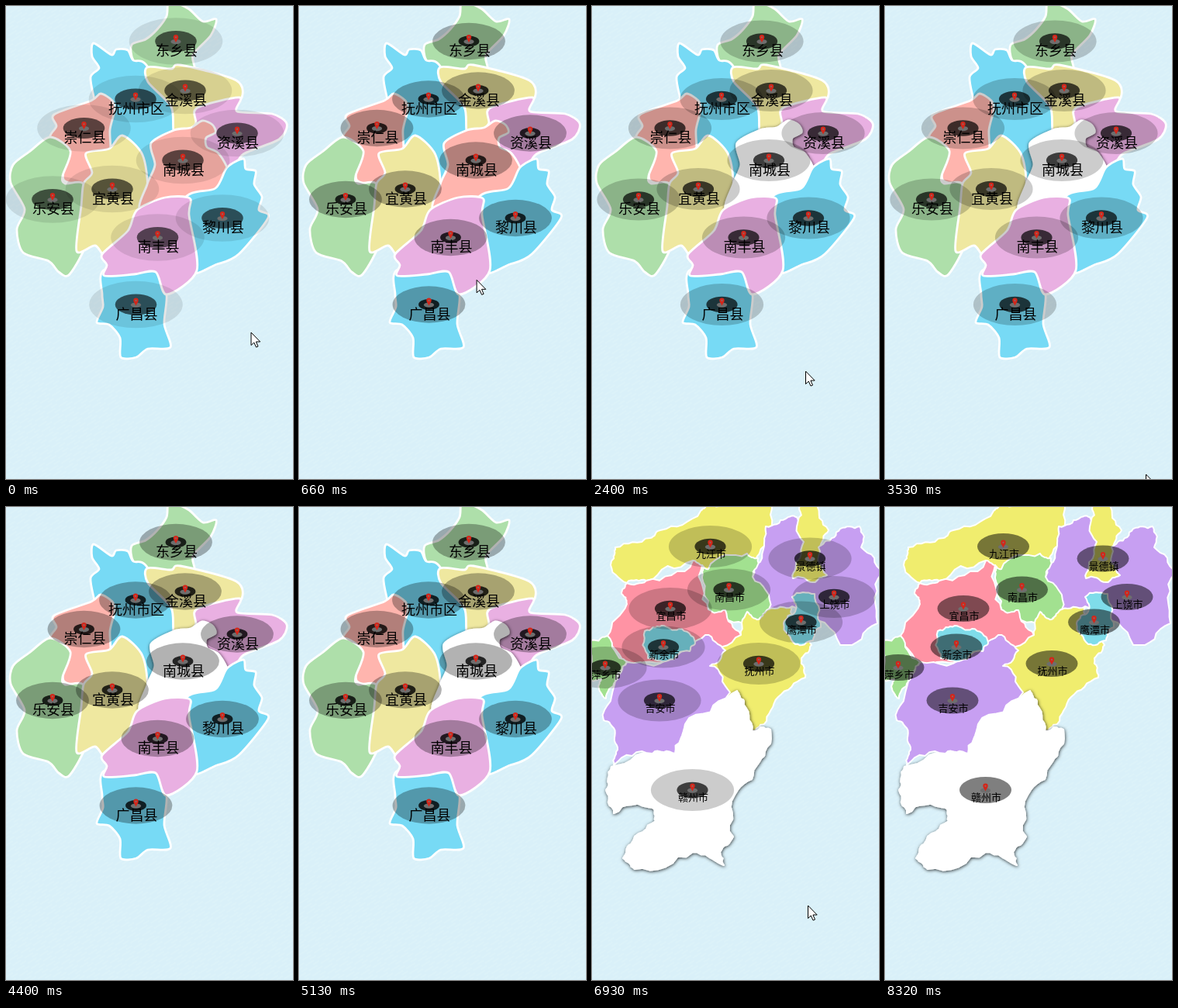
Animation of 370 by 610 pixels, one loop 8.42 s. Source, as an HTML page:

```html
<!DOCTYPE html>
<html lang="zh">
<head>
<meta charset="utf-8">
<title>Map ripples</title>
<style>
html, body { margin: 0; width: 100%; height: 100%; overflow: hidden; background: #d9f0f9; }
svg { display: block; width: 370px; height: 610px; }
text { font-family: "Noto Sans CJK SC", "Noto Sans CJK", "Noto Sans", sans-serif; text-anchor: middle; fill: #000; }
.land { stroke: #fff; stroke-linejoin: round; }
.hot { fill: #fff; filter: url(#glow); }
</style>
</head>
<body>
<svg id="stage" viewBox="0 0 370 610" xmlns="http://www.w3.org/2000/svg">
  <defs>
    <pattern id="weave" width="18" height="8" patternUnits="userSpaceOnUse" patternTransform="rotate(-32)">
      <rect width="18" height="8" fill="#d9f0f9"/>
      <path d="M0 2H13M9 6H18" stroke="#dcf2f9" stroke-width="2"/>
    </pattern>
    <filter id="glow" x="-20%" y="-20%" width="140%" height="140%">
      <feDropShadow dx="0.5" dy="1" stdDeviation="2.2" flood-color="#000" flood-opacity=".8"/>
    </filter>
    <g id="pin">
      <ellipse cy=".6" rx="6.6" ry="3.2" fill="#6e6e6e"/>
      <path d="M0 1.5C-1 -1 -3.2 -2.8 -3.2 -5.2A3.2 3.2 0 0 1 3.2 -5.2C3.2 -2.8 1 -1 0 1.5Z" fill="#d3261a"/>
      <circle cy="-5.2" r="1.1" fill="#8d6a66"/>
    </g>
  </defs>
  <rect width="370" height="610" fill="url(#weave)"/>
  <g id="maps"></g>
  <path id="mouse" d="M0 0V16.5L3.8 13L6.5 19L9 18L6.4 12H11.7Z" fill="#fff" stroke="#000" stroke-width="1"/>
</svg>
<script>
const LOOP = 8420;
const REACH = 67;

// name, colour, marker x, marker y, key points; later lands cover the loose edges of earlier ones
const counties = [
  ["东乡县", "#aedfaa", 219, 45.5, "209,-4 207,13 195,30 180,43 162,50 164,70 182,85 240,85 241,63 264,38 271,17 254,20 236,4 218,-4"],
  ["抚州市区", "#77daf5", 167, 120, "113,48 136,63 142,56 157,57 164,70 183,79 225,165 185,225 130,190 115,125 109,92 120,80 111,65"],
  ["金溪县", "#efe8a0", 231, 109, "182,79 213,81 225,76 297,96 301,122 255,140 238,160 217,165 213,130 183,98"],
  ["资溪县", "#e9b0e2", 298, 164, "247,131 301,118 298,136 343,139 362,152 352,172 306,191 290,212 255,195 245,150"],
  ["崇仁县", "#ffb5ae", 100.5, 157.5, "62,140 110,122 122,113 137,122 140,135 134,160 134,195 115,225 75,225 75,185 57,169 65,155"],
  ["乐安县", "#aedfaa", 60, 249.5, "57,169 83,187 73,219 76,229 102,232 105,300 82,346 68,343 55,329 22,318 14,288 24,262 6,228 9,205 30,188"],
  ["宜黄县", "#efe8a0", 137, 236, "103,190 133,184 150,167 176,192 182,240 165,290 130,322 115,309 91,316 97,258 100,229 111,215"],
  ["南城县", "#ffb5ae", 228, 199, "187,177 217,160 238,157 253,148 266,153 270,163 258,170 259,182 273,189 285,208 290,225 250,255 175,265 182,230 192,205"],
  ["黎川县", "#77daf5", 279, 273.5, "230,250 270,235 285,208 306,197 309,210 322,213 320,230 330,246 326,263 338,273 300,320 272,333 235,341"],
  ["广昌县", "#77daf5", 167.5, 385, "127,340 195,335 207,372 204,410 212,440 183,442 168,453 148,453 147,428 133,411 117,408 125,388 124,372"],
  ["南丰县", "#e9b0e2", 195.5, 298.5, "169,263 205,247 237,248 236,270 246,341 207,372 193,343 165,346 127,348 130,334 124,320 157,290"]
];

const cities = [
  ["九江市", "#f0ed6e", 152.5, 51, "25,70 30,52 75,40 88,30 140,5 150,-5 232,-5 220,52 210,75 150,90 130,69 70,95 45,98"],
  ["上饶市", "#c79ff2", 312, 116, "224,25 250,15 264,13 280,60 300,45 320,28 345,25 347,52 374,85 368,150 320,178 270,130 228,132 207,90 222,50"],
  ["景德镇", "#f0ed6e", 281, 66.5, "268,-5 290,-5 305,30 292,52 303,88 285,97 259,92 268,66 264,25"],
  ["南昌市", "#a2e190", 176.5, 106.5, "142,75 150,80 200,60 214,66 207,90 228,132 215,145 195,150 150,132 142,92"],
  ["宜昌市", "#ff93a4", 101, 131, "45,98 70,95 130,69 142,75 150,132 172,133 192,165 172,185 110,180 60,205 20,166 45,125 38,110"],
  ["萍乡市", "#a2e190", 17, 207, "-5,172 20,166 45,200 30,225 18,247 10,238 12,222 -5,225"],
  ["抚州市", "#f0ed6e", 215, 202, "192,165 200,135 215,145 228,132 258,128 283,178 270,195 275,220 240,245 222,280 206,289 196,265 175,245 150,205"],
  ["鹰潭市", "#7fdcea", 269.5, 148.5, "258,116 287,112 295,155 285,172 262,177 247,150 262,135"],
  ["赣州市", "#f0ed6e", 129.5, 365, "187,237 196,250 206,289 230,287 215,330 188,365 182,425 165,445 170,462 130,445 55,467 40,453 50,435 82,405 78,388 28,395 18,365 25,335 90,310 130,265"],
  ["吉安市", "#c79ff2", 87, 249.5, "45,200 111,190 146,165 172,185 152,205 178,239 120,280 107,318 78,318 28,333 33,310 28,285 15,275 30,225"],
  ["新余市", "#7fdcea", 92, 180.5, "68,160 90,153 112,157 133,175 126,186 98,198 72,195"]
];

const $ = id => document.getElementById(id);
const points = s => s.split(" ").map(p => p.split(",").map(Number));

function smoothPath(s) {
  const p = points(s), n = p.length, at = i => p[(i + n) % n], k = 0.14;
  let d = `M${p[0]}`;
  for (let i = 0; i < n; i++) {
    const [a, b, c, e] = [at(i - 1), at(i), at(i + 1), at(i + 2)];
    d += `C${b[0] + (c[0] - a[0]) * k},${b[1] + (c[1] - a[1]) * k} ${c[0] - (e[0] - b[0]) * k},${c[1] - (e[1] - b[1]) * k} ${c}`;
  }
  return d + "Z";
}

// Splits an edge in half and pushes the middle sideways by a seeded amount.
function crinkle(a, b, depth) {
  if (!depth) return `L${b}`;
  const mx = (a[0] + b[0]) / 2, my = (a[1] + b[1]) / 2;
  const seed = Math.sin(mx * 12.9898 + my * 78.233) * 43758.5453;
  const bend = (seed - Math.floor(seed) - 0.5) * 0.36;
  const m = [mx - (b[1] - a[1]) * bend, my + (b[0] - a[0]) * bend];
  return crinkle(a, m, depth - 1) + crinkle(m, b, depth - 1);
}

function roughPath(s) {
  const p = points(s);
  return `M${p[0]}` + p.map((a, i) => crinkle(a, p[(i + 1) % p.length], 3)).join("") + "Z";
}

function buildMap(id, places, outline, line, size, drop) {
  const lands = places.map(([name, fill, , , s]) =>
    `<path class="land" data-name="${name}" d="${outline(s)}" fill="${fill}" stroke-width="${line}"/>`);
  const marks = places.map(([, , x, y]) =>
    `<g transform="translate(${x} ${y})"><ellipse class="outer"/><ellipse class="inner"/><use href="#pin"/></g>`);
  const names = places.map(([name, , x, y]) => `<text x="${x + 1}" y="${y + drop}" font-size="${size}">${name}</text>`);
  $("maps").insertAdjacentHTML("beforeend", `<g id="${id}">${lands.join("")}${marks.join("")}${names.join("")}</g>`);
  const root = $(id), all = c => [...root.querySelectorAll(c)];
  return { root, lands: all(".land"), outer: all(".outer"), inner: all(".inner") };
}

const county = buildMap("county", counties, smoothPath, 2.8, 18, 18.5);
const city = buildMap("city", cities, roughPath, 2, 13, 14);

// time, screen refreshes so far, ripple steps so far
const pace = [[0, 0, 4], [1320, 10, 21], [2400, 18, 33], [3530, 24, 48], [5130, 32, 67], [6930, 45, 88], [8320, 54, 105], [LOOP, 55, 106]];

// time, x, y
const trips = [
  [[0, 316, 421], [790, 212, 340], [1320, 220.5, 382], [1800, 234, 235], [2400, 275.5, 471], [2940, 332, 587], [3530, 336.5, 604], [3950, 372, 606]],
  [[5520, 353, 606], [6210, 326, 584], [6930, 278.5, 514], [7390, 300, 574], [7640, 300, 574]]
];

// Values of a keyed track at time t, or null outside it
function track(keys, t) {
  const i = keys.findIndex(k => k[0] > t);
  if (i < 1) return null;
  const a = keys[i - 1], b = keys[i], u = (t - a[0]) / (b[0] - a[0]);
  return a.map((v, j) => v + (b[j] - v) * u);
}

// The screen refreshes in even beats between the pace keys.
function refresh(t) {
  const i = pace.findIndex(k => k[0] > t), a = pace[i - 1], b = pace[i];
  const beats = b[1] - a[1];
  const u = Math.floor((t - a[0]) / (b[0] - a[0]) * beats) / beats;
  return { now: a[0] + (b[0] - a[0]) * u, step: a[2] + Math.floor((b[2] - a[2]) * u + 1e-6) };
}

function ripple(list, part) {
  for (const e of list) {
    e.setAttribute("rx", REACH * part);
    e.setAttribute("ry", REACH * part / 2 + 0.2);
    e.setAttribute("fill-opacity", 1 - part);
  }
}

function draw(time) {
  const { now, step } = refresh(time % LOOP);

  const map = now < 6350 ? county : city;
  const hot = map === city ? "赣州市" : now < 790 ? "" : now < 1730 ? "南丰县" : "南城县";
  for (const m of [county, city]) m.root.style.display = m === map ? "" : "none";
  for (const land of map.lands) land.classList.toggle("hot", land.dataset.name === hot);

  const part = step % 5 / 10;
  ripple(map.outer, part + 0.5);
  ripple(map.inner, part);

  const spot = track(trips[0], now) || track(trips[1], now);
  $("mouse").style.display = spot ? "" : "none";
  if (spot) $("mouse").setAttribute("transform", `translate(${spot[1]} ${spot[2]})`);
}

let start;
function loop(now) {
  start ??= now;
  draw(now - start);
  requestAnimationFrame(loop);
}
draw(0);
requestAnimationFrame(loop);
</script>
</body>
</html>
```
